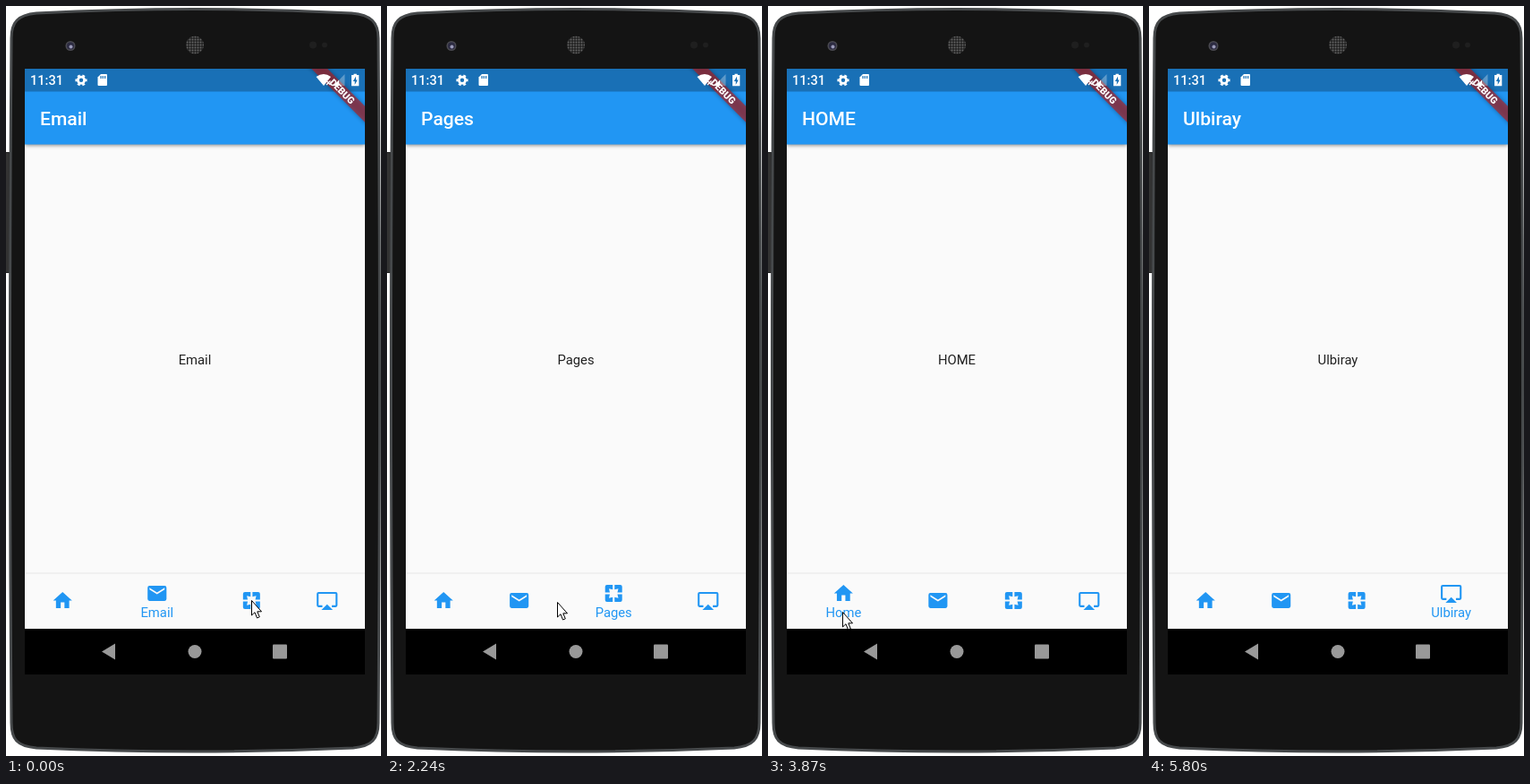
Write an HTML page that moves like this. It is 419 by 837 pixels and loops after 6200 ms.

```html
<!DOCTYPE html>
<html lang="en">
<head>
<meta charset="utf-8">
<title>Bottom navigation</title>
<style>
  html, body { margin: 0; width: 100%; height: 100%; overflow: hidden; background: #fff; }
  svg { display: block; width: 419px; height: 837px; font-family: Roboto, sans-serif; }
  .mid { text-anchor: middle; }
  .blue { fill: #2196f3; }
  .bar { filter: drop-shadow(0 1.5px 2px #0007); }
</style>
</head>
<body>
<svg viewBox="0 0 419 837">
  <defs>
    <clipPath id="screen"><rect x="21" y="70" width="380" height="676"/></clipPath>
    <clipPath id="tabBar"><rect x="21" y="633.5" width="380" height="61.5"/></clipPath>
    <pattern id="mesh" width="3" height="3" patternUnits="userSpaceOnUse">
      <rect width="3" height="3" fill="#222"/><circle cx="1.5" cy="1.5" r="1" fill="#666"/>
    </pattern>
  </defs>

  <!-- phone -->
  <path d="M0 163H5V298H0Z" fill="#222"/>
  <path d="M0 164H3V297H0Z" fill="#333"/>
  <path d="M6 36C6 18 13 10 34 8Q211 -1 386 8C408 10 416 18 416 36Q419 418 416 800C416 818 409 826 388 828Q211 836 34 828C12 826 6 818 6 800Q3 418 6 36Z"
        fill="#141414" stroke="#46494b" stroke-width="3"/>
  <circle cx="72" cy="44.5" r="5.5" fill="#4a4a50"/>
  <circle cx="72" cy="44.5" r="4" fill="#2c2b42"/>
  <circle cx="72.5" cy="45.5" r="2" fill="#9a9ab8"/>
  <circle cx="211" cy="43.5" r="10" fill="url(#mesh)"/>
  <circle cx="343" cy="43.5" r="4" fill="#1f1f1f"/>
  <circle cx="356" cy="43.5" r="3" fill="#1f1f1f"/>

  <g clip-path="url(#screen)">
    <path d="M21 70H401V746H21Z" fill="#fafafa"/>
    <path class="blue bar" d="M21 70H401V154.5H21Z"/>
    <path d="M21 70H401V95.5H21Z" fill="#1970b6"/>
    <text id="title" x="38" y="133" font-size="21.1" font-weight="500" fill="#fff"/>
    <text id="body" class="mid" x="211" y="399.5" font-size="14.8" fill="#212121"/>

    <!-- debug ribbon -->
    <g transform="translate(401 70) rotate(45) scale(1.0556)">
      <path d="M-45 28H45V40H-45Z" fill="#0005" style="filter:blur(2.5px)"/>
      <path d="M-45 28H45V40H-45Z" fill="#b71c1c" opacity=".63"/>
      <text class="mid" y="37.6" font-size="10.2" font-weight="900" fill="#fff">DEBUG</text>
    </g>

    <!-- status bar -->
    <g fill="#fff">
      <text x="27" y="88" font-size="14.6" font-weight="500">11:31</text>
      <g fill="none" stroke="#fff">
        <circle cx="84" cy="82.8" r="3.6" stroke-width="2.8"/>
        <circle cx="84" cy="82.8" r="5.5" stroke-width="2.2" pathLength="12" stroke-dasharray="1" stroke-dashoffset=".5"/>
      </g>
      <path d="M106 76H112Q113 76 113 77V88Q113 89 112 89H103.5Q102.5 89 102.5 88V79.5Z"/>
      <path d="M106 78V81M108.3 78V81M110.6 78V81" stroke="#1970b6" stroke-width="1.2"/>
      <path d="M346.5 79Q355 73 363 79L355 89Z"/>
      <path d="M358 83.5L362.5 88M362.5 83.5L358 88" stroke="#fff" stroke-width="1.3"/>
      <path d="M378.5 76V89H366Z" opacity=".3"/>
      <path d="M372 82.5V89H366Z"/>
      <path d="M388.5 77V75.7H391.8V77H394.3V89.3H386V77Z"/>
      <path d="M391 78.5L387.8 84H389.7V88L392.7 82.5H391Z" fill="#1970b6"/>
    </g>

    <!-- tabs -->
    <path d="M21 632H401V634H21Z" fill="#f0f0f0"/>
    <circle id="ripple" cy="664" opacity=".1" clip-path="url(#tabBar)"/>
    <g id="tabs" class="blue"></g>

    <!-- system buttons -->
    <path d="M21 695H401V746H21Z"/>
    <g fill="#999">
      <path d="M107 720.5L122 711.5V729.5Z"/>
      <circle cx="211" cy="720.5" r="7.5"/>
      <rect x="298" y="712.5" width="16" height="16" rx="1"/>
    </g>
  </g>

  <g fill="#fff" stroke="#000">
    <path id="arrow" d="M.5 .5V17L4 13.7L6.5 20L9.3 18.8L6.8 12.8H11.5Z"/>
    <path id="resize" d="M393.5 799.5H400.5L398.5 801.5L407.5 810.5L409.5 808.5V815.5H402.5L404.5 813.5L395.5 804.5L393.5 806.5Z"/>
  </g>
</svg>

<script>
const LOOP = 6200, FRAME = 136.5, DELAY = 27;
const $ = id => document.getElementById(id);

const pages = [
  { title: 'HOME', label: 'Home', icon: 'M10 20v-6h4v6h5v-8h3L12 3 2 12h3v8z' },
  { title: 'Email', label: 'Email', icon: 'M20 4H4a2 2 0 0 0-2 2v12a2 2 0 0 0 2 2h16a2 2 0 0 0 2-2V6a2 2 0 0 0-2-2zm0 4l-8 5-8-5V6l8 5 8-5z' },
  { title: 'Pages', label: 'Pages', icon: 'M3 5v6h5L7 7l4 1V3H5a2 2 0 0 0-2 2zm5 8H3v6a2 2 0 0 0 2 2h6v-5l-4 1zm9 4l-4-1v5h6a2 2 0 0 0 2-2v-6h-5zm2-14h-6v5l4-1-1 4h5V5a2 2 0 0 0-2-2z' },
  { title: 'Ulbiray', label: 'Ulbiray', icon: 'M6 22h12l-6-6zM21 3H3a2 2 0 0 0-2 2v12a2 2 0 0 0 2 2h4v-2H3V5h18v12h-4v2h4a2 2 0 0 0 2-2V5a2 2 0 0 0-2-2z' }
];

const taps = [
  { page: 1, at: -9 }, { page: 2, at: .95 }, { page: 3, at: 5.5 },
  { page: 2, at: 13.33 }, { page: 1, at: 17.92 }, { page: 0, at: 24.6 },
  { page: 1, at: 30.9 }, { page: 2, at: 34.9 }, { page: 3, at: 38.5 }
];

// The pointer glides between these: [time, x, y]
const stops = [
  [1, 274, 663], [3, 355, 661], [7, 355, 661], [10, 241, 666], [15, 228, 667],
  [17, 152, 663], [20, 137, 665], [24, 26, 667], [28, 83, 676], [30, 213, 674],
  [32, 213, 674], [35, 276, 664], [36, 276, 664], [37, 352, 664]
];

$('tabs').innerHTML = pages.map(p =>
  `<path d="${p.icon}"/><text class="mid" font-size="14.8">${p.label}</text>`).join('');
const icons = document.querySelectorAll('#tabs path');
const labels = document.querySelectorAll('#tabs text');

const clamp = v => Math.min(1, Math.max(0, v));

function set(el, attrs) {
  for (const name in attrs) el.setAttribute(name, attrs[name]);
}

function pointerAt(now) {
  const i = stops.findIndex(s => s[0] > now);
  if (i < 0) return stops.at(-1).slice(1);
  const b = stops[i], a = stops[i - 1] ?? b;
  const p = a === b ? 0 : (now - a[0]) / (b[0] - a[0]);
  return [1, 2].map(k => Math.round(a[k] + (b[k] - a[k]) * p));
}

function draw(t) {
  const now = Math.max(0, Math.floor((t - DELAY) / FRAME));

  // A press starts the ripple; one frame later the page turns and the tabs slide.
  const press = taps.findLast(tap => tap.at <= now);
  const age = now - press.at;
  const turned = taps.findLastIndex(tap => tap.at + 1 <= now);
  const page = taps[turned].page;
  const old = taps[turned - 1]?.page;
  const slide = clamp(now - taps[turned].at - 1);

  $('title').textContent = $('body').textContent = pages[page].title;

  // The selected tab is half as wide again as the others.
  let left = 21;
  const centers = pages.map((_, i) => {
    const on = i === page ? slide : i === old ? 1 - slide : 0;
    const width = 380 * (1 + on / 2) / 4.5;
    const x = left + width / 2;
    left += width;
    set(icons[i], { transform: `translate(${x} ${663.5 - 8 * on}) scale(1.0556) translate(-12 -12)` });
    set(labels[i], { x, y: 690 - 8 * on, opacity: on });
    return x;
  });

  set($('ripple'), { cx: centers[press.page], r: age < 2 ? 37 * clamp(age * 2) : 0 });

  const [x, y] = pointerAt(now);
  set($('arrow'), { transform: `translate(${x} ${y})`, visibility: now < 41 ? 'visible' : 'hidden' });
  set($('resize'), { visibility: now === 41 ? 'visible' : 'hidden' });
}

const start = performance.now();
function tick() {
  draw((performance.now() - start) % LOOP);
  requestAnimationFrame(tick);
}
tick();
</script>
</body>
</html>
```
